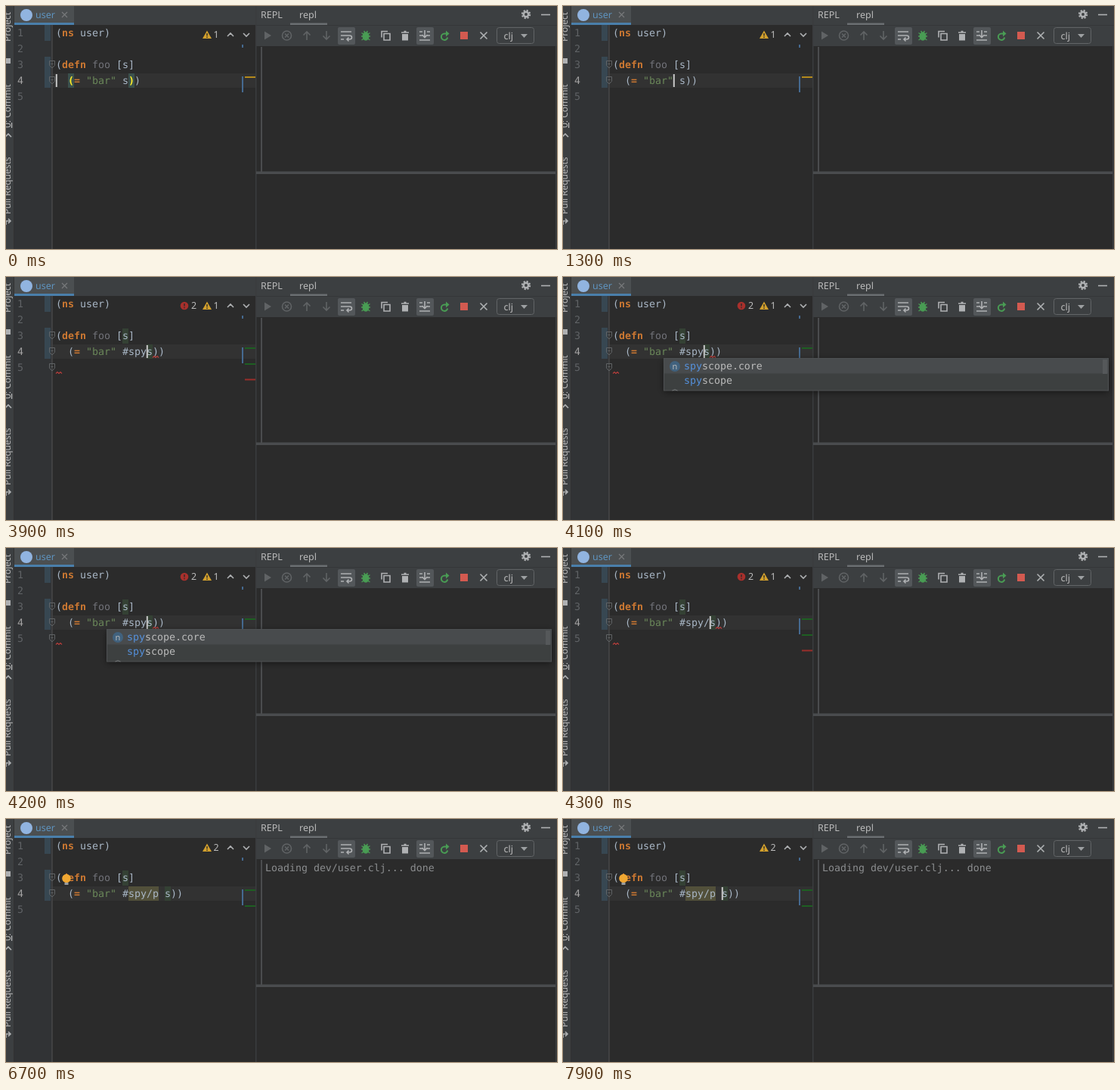
An HTML page that plays this animation: 729x321 px, repeating every 8000 ms.

```html
<!DOCTYPE html>
<html lang="en">
<head>
<meta charset="utf-8">
<title>Editor and REPL</title>
<style>
  html, body { margin: 0; width: 100%; height: 100%; overflow: hidden; background: #2b2b2b; }
  svg { display: block; width: 729px; height: 321px; }
  text { white-space: pre; text-rendering: geometricPrecision; }
  .code { font: 13.288px "DejaVu Sans Mono", monospace; fill: #a9b7c6; }
  .ui { font: 12.5px "Noto Sans", sans-serif; fill: #bbb; }
  .soft { filter: blur(.5px); }
  .faint { filter: blur(.3px); }
  .kw { fill: #cc7832; font-weight: bold; }
  .str { fill: #6a8759; }
  .dim { fill: #72737a; }
  .num { fill: #606366; }
  .hit { fill: #589df6; fill-opacity: .85; }
  .use { fill: #344134; }
  .match rect { fill: #3b514d; }
  .match text { fill: #ffef28; font-weight: bold; }
  .line { fill: none; stroke: #afb1b3; stroke-width: 1.6; }
  .off { fill: none; stroke: #606365; stroke-width: 1.6; }
  .wave { fill: none; stroke: #bc3f3c; stroke-width: 1.1; }
</style>
</head>
<body>
<svg viewBox="0 0 729 321">
  <defs>
    <path id="fold" class="off" style="stroke-width:1" d="M-3.5 -4.5h7v6l-3.5 3.5l-3.5 -3.5zM-1.5 -.5h3"/>
    <path id="wave" class="wave" d="M0 1.5l2 -2l2 2l2 -2l2 2"/>
    <filter id="shade" x="-5%" y="-40%" width="110%" height="190%">
      <feDropShadow dx="0" dy="2" stdDeviation="4" flood-color="#000" flood-opacity=".5"/>
    </filter>
  </defs>
  <rect width="729" height="321" fill="#2b2b2b"/>

  <!-- tool stripe, tab bar, gutter -->
  <g class="soft">
    <rect x="-5" y="-5" width="336" height="30" fill="#3c3f41"/>
    <rect x="-5" y="-5" width="15.5" height="331" fill="#3c3f41"/>
    <rect x="11" y="25" width="50" height="301" fill="#313335"/>
    <rect x="10" y="-5" width="1" height="331" fill="#323232"/>
    <rect x="11" y="-5" width="79" height="30" fill="#4b4f51"/>
    <rect x="11" y="22" width="79" height="3" fill="#4a7fab"/>
    <circle cx="27" cy="12" r="8" fill="#91b4e0"/>
    <text class="ui" x="39" y="16" style="fill:#5f94c0">user</text>
    <path class="off" style="stroke:#77797b;stroke-width:1.2" d="M74 8l7 7m0 -7l-7 7"/>
    <g class="ui" style="font-size:12px">
      <text transform="translate(6 47) rotate(-90)">Project</text>
      <text transform="translate(6 161) rotate(-90)"><tspan text-decoration="underline">0</tspan>: Commit</text>
      <text transform="translate(6 275) rotate(-90)">Pull Requests</text>
    </g>
    <rect x="-3" y="69" width="9" height="7" fill="#afb1b3"/>
    <path class="line" d="M-1 173l4 -4l4 4M0 289v-5h6m-3 -3l3 3l-3 3"/>
    <rect x="51" y="25" width="8" height="21" fill="#374752"/>
    <rect x="51" y="67" width="8" height="41" fill="#374752"/>
    <rect x="60.5" y="25" width="1" height="300" fill="#555"/>
    <rect x="62" y="89" width="268" height="19" fill="#323232"/>
    <g class="code num">
      <text class="num" x="15" y="40">1</text>
      <text class="num" x="15" y="61">2</text>
      <text class="num" x="15" y="82">3</text>
      <text x="15" y="103" fill="#a4a3a3">4</text>
      <text class="num" x="15" y="124">5</text>
    </g>
    <use href="#fold" x="61" y="77"/>
    <use href="#fold" x="61" y="98"/>
    <use href="#fold" x="61" y="119" data-on="3000-5000"/>
  </g>

  <!-- code -->
  <g class="code soft">
    <rect class="use" x="154" y="68" width="8" height="20" data-on="1700-8000"/>
    <text x="66" y="40">(<tspan class="kw">ns</tspan> user)</text>
    <text x="66" y="82">(<tspan class="kw">defn</tspan> <tspan class="dim">foo</tspan> [s]</text>
    <rect x="162" y="89" width="40" height="19" fill="#52503a" data-on="5000-8000"/>
    <text x="82" y="103">(<tspan class="kw">=</tspan> <tspan class="str">"bar"</tspan></text>
    <text id="typed" x="154" y="103"></text>
    <g id="tail">
      <rect class="use" y="89" width="8" height="19" data-on="1700-8000"/>
      <text y="103">s))</text>
      <use href="#wave" x="8" y="105" data-on="3000-5000"/>
    </g>
    <g class="match" data-on="0-900">
      <rect x="82" y="89" width="8" height="19"/><text x="82" y="103">(</text>
      <rect x="162" y="89" width="8" height="19"/><text x="162" y="103">)</text>
    </g>
    <use href="#wave" x="66" y="126" data-on="3000-5000"/>
    <g data-on="6700-8000">
      <circle cx="80" cy="78.5" r="5.7" fill="#f0a732"/>
      <rect x="77.5" y="84" width="5" height="3" fill="#9a9c9e"/>
    </g>
    <rect id="caret" y="90" width="2" height="17" fill="#c8c8c8" data-on="0-2300 2600-6500 6900-7400 7900-8000"/>
  </g>

  <!-- inspection counts and stripe marks -->
  <g class="soft">
    <g data-on="3600-5500">
      <circle cx="236" cy="38" r="5.3" fill="#a8302c"/>
      <path d="M236 35v3.5m0 1.3v1.4" stroke="#2b2b2b" stroke-width="1.4"/>
      <text class="ui" x="245" y="42">2</text>
    </g>
    <path d="M266 32.5l6 10.5h-12z" fill="#d3a02c"/>
    <path d="M266 36v3.5m0 1v1.4" stroke="#2b2b2b" stroke-width="1.4"/>
    <text class="ui" x="274.5" y="42" data-on="0-5500">1</text>
    <text class="ui" x="274.5" y="42" data-on="5500-8000">2</text>
    <path class="line" d="M293 40l4 -4l4 4M314 36l4 4l4 -4"/>
    <rect x="312" y="51" width="2" height="4" fill="#456a90"/>
    <rect x="312" y="93" width="2" height="21" fill="#456a90"/>
    <rect x="316" y="93" width="14" height="2" fill="#b48a1c" data-on="0-1700"/>
    <g fill="#1e5f22" data-on="1700-8000">
      <rect x="316" y="93" width="14" height="2"/>
      <rect x="316" y="114" width="14" height="2"/>
    </g>
    <rect x="316" y="134.500" width="14" height="2" fill="#9a2f2b" data-on="3000-5000"/>
  </g>

  <!-- REPL panel -->
  <g class="faint">
    <rect x="331" y="-5" width="403" height="58" fill="#3c3f41"/>
    <rect x="330" y="-5" width="1.500" height="331" fill="#3a3c3e"/>
    <rect x="331" y="25" width="403" height="1" fill="#353739"/>
    <rect x="337" y="54" width="2" height="165" fill="#4a4c4e"/>
    <rect x="331" y="218.500" width="397" height="3.500" fill="#4a4c4e"/>
    <rect x="727" y="53" width="1.500" height="273" fill="#3c3f41"/>
    <text class="ui" x="337" y="16">REPL</text>
    <text class="ui" x="388" y="16">repl</text>
    <rect x="376" y="22.500" width="49" height="2.500" fill="#6b6f72"/>
    <circle class="line" cx="688" cy="11" r="3.200" style="stroke-width:2.600"/>
    <circle class="line" cx="688" cy="11" r="5.200" style="stroke-width:2;stroke-dasharray:2.200 1.884"/>
    <path class="line" d="M708 11.500h12"/>

    <path d="M342 33.500l9 5.500l-9 5.500z" fill="#606365"/>
    <g class="off">
      <circle cx="371.500" cy="39" r="6"/>
      <path d="M369 36.500l5 5m0 -5l-5 5M398 45v-11m-4.500 4.500l4.500 -4.500l4.500 4.500M424 33v11m-4.500 -4.500l4.500 4.500l4.500 -4.500"/>
    </g>
    <rect x="439" y="28" width="23" height="23" rx="2" fill="#53575a"/>
    <rect x="543" y="28" width="23" height="23" rx="2" fill="#53575a"/>
    <g class="line">
      <path d="M443 34h14M443 39h11.500q3 0 3 2.500t-3 2.500h-3M443 44h4M453.500 41.500l-2.500 2.500l2.500 2.500"/>
      <path d="M497 41.500v-8h8M500 36.500h8v8.500h-8z"/>
      <path d="M523 35h10M526.500 33.500h3"/>
      <path d="M547 34h4M547 39h4M557 34h4M557 39h4M547 45h14M554 32v9m-3.500 -3l3.500 3.500l3.500 -3.500"/>
      <path d="M627.500 34.500l9 9m0 -9l-9 9"/>
    </g>
    <path d="M524 37h8v8.500h-8z" fill="#afb1b3"/>
    <g stroke="#499c54" stroke-width="1.500" fill="none">
      <ellipse cx="476" cy="40" rx="3.700" ry="5" fill="#499c54"/>
      <path d="M470.500 35.500l3 2M481.500 35.500l-3 2M470 40h12M470.500 45l3 -2M481.500 45l-3 -2M473.500 33l1.500 2M478.500 33l-1.500 2"/>
      <path d="M584 36.500h-4a4.200 4.200 0 1 0 4.200 5" stroke-width="2"/>
      <path d="M582 32.500l4.500 4l-4.500 4z" fill="#499c54" stroke="none"/>
    </g>
    <rect x="601" y="34" width="10" height="10" fill="#d35a50"/>
    <rect x="649.500" y="28.500" width="49" height="21" rx="3" fill="#3c3f41" stroke="#626567"/>
    <text class="ui" x="658.500" y="43.500">clj</text>
    <path d="M681 37h9l-4.500 5z" fill="#9da0a2"/>
    <text class="code" x="343" y="69" style="fill:#8b8d8f" data-on="6200-8000">Loading dev/user.clj... done</text>
  </g>

  <!-- completion popup -->
  <g data-on="4100-4300">
    <rect x="133.500" y="107.500" width="588" height="42.500" fill="#3c3f41" filter="url(#shade)"/>
    <rect x="134" y="108" width="587" height="19.500" fill="#484b4d"/>
    <rect x="714" y="109" width="6" height="19" fill="#55585a"/>
    <rect x="133.500" y="107.500" width="588" height="42.500" fill="none" stroke="#4e5153"/>
    <circle cx="148" cy="118" r="7" fill="#41627e"/>
    <text class="ui" x="148" y="122" text-anchor="middle" style="font-size:11px">n</text>
    <path class="line" style="stroke:#777a7c;stroke-width:1" d="M144.500 150q3.500 -2.500 7 0"/>
    <text class="code" x="160" y="122" style="fill:#bbb"><tspan class="hit">spy</tspan>scope.core</text>
    <text class="code" x="160" y="141" style="fill:#bbb"><tspan class="hit">spy</tspan>scope</text>
  </g>
</svg>
<script>
  const LOOP = 8000, LEFT = 66, PITCH = 8, TAIL_COL = 11;
  const $ = id => document.getElementById(id);

  // [start time, caret column] until the caret reaches the typing place
  const moves = [[0, 0], [200, 1], [800, 2], [900, 5], [1000, 9], [1300, 10], [1500, TAIL_COL]];
  // [start time, number of characters typed]
  const word = '#spy/p ';
  const keys = [[0, 0], [2600, 1], [3700, 2], [3800, 3], [3900, 4], [4300, 5], [4400, 6], [4600, 7]];

  const timed = [...document.querySelectorAll('[data-on]')].map(el => ({
    el, spans: el.dataset.on.split(' ').map(s => s.split('-').map(Number))
  }));
  const at = (steps, t) => steps.filter(s => s[0] <= t).pop()[1];
  const place = (id, col, dx = 0) =>
    $(id).setAttribute('transform', `translate(${LEFT + PITCH * col + dx} 0)`);

  function draw(t) {
    for (const { el, spans } of timed)
      el.style.display = spans.some(([a, b]) => t >= a && t < b) ? '' : 'none';
    const count = at(keys, t);
    $('typed').textContent = word.slice(0, count);
    place('tail', TAIL_COL + count);
    place('caret', at(moves, t) + count, -.2);
  }

  function tick() {
    draw(performance.now() % LOOP);
    requestAnimationFrame(tick);
  }
  tick();
</script>
</body>
</html>
```
